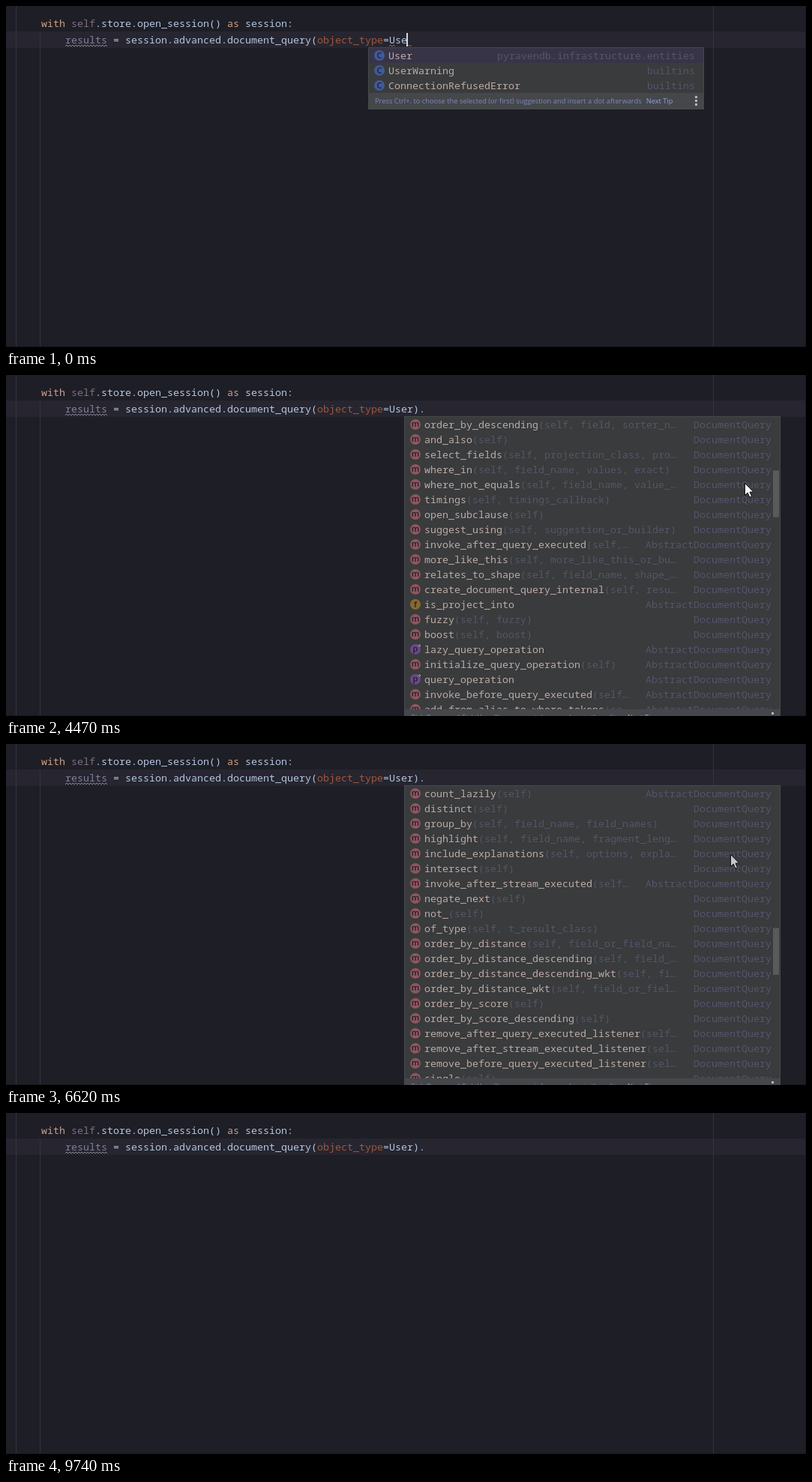
Animation, 1067 px wide and 455 px high, one loop 9.81 s. Source, as an HTML page with a canvas:

```html
<!DOCTYPE html>
<html lang="en">
<head>
<meta charset="utf-8">
<title>Code completion</title>
<style>
  html, body { margin: 0; width: 100%; height: 100%; overflow: hidden; background: #1e1e26; }
  canvas { display: block; }
</style>
</head>
<body>
<canvas id="stage" width="1067" height="455"></canvas>
<script>
const ctx = document.getElementById('stage').getContext('2d');
const W = 1067, H = 455, LOOP = 9810;
const CELL = 8, ROW = 20, TOP = 56, VIEW = 390;
const MONO = '13.333px "Noto Sans Mono", monospace';
const SMALL = '9.33px "Open Sans", sans-serif';
const ICON = '600 11px "Open Sans", sans-serif';

const C = {
  bg: '#1e1e26', line: '#262530', guide: '#34343f', edge: '#19191f',
  popup: '#393b3c', border: '#47494c', selected: '#383448', footer: '#45474a',
  name: '#bdaaa5', dim: '#55556b', thumb: '#595a5c', tip: '#7e89bd', link: '#8ea3e2',
  code: '#b4c6e0', key: '#cb9f85', self: '#7f7181', param: '#a0583a', weak: '#80809a',
};
const ICONS = { m: '#8f5560', p: '#69498a', f: '#8a672f', g: '#7d7028', C: '#40599a' };

// kind, name(args), then an optional owner: A or o
const OWNERS = { A: 'AbstractDocumentQuery', o: 'object', d: 'DocumentQuery' };
const members = `
p session :A
p index_name :A
p collection_name :A
p index_query :A
p query_class :A
p conventions :A
m first(self)
m add_parameter(self, name, value)
m take(self, count)
m include(self, path_or_include_builder_callback)
m statistics(self, stats_callback)
m no_tracking(self)
m skip(self, count)
m aggregate_by(self, builder_or_facet)
m where_equals(self, field_name, value_or_method)
m where(self, exact, kwargs)
m order_by(self, field, sorter_name_or_ordering)
m wait_for_non_stale_results(self, wait_timeout)
m where_greater_than(self, field_name, value, exact)
m proximity(self, proximity)
m or_else(self)
m where_exists(self, field_name)
m order_by_descending(self, field, sorter_name_or)
m and_also(self)
m select_fields(self, projection_class, projection)
m where_in(self, field_name, values, exact)
m where_not_equals(self, field_name, value_or_method)
m timings(self, timings_callback)
m open_subclause(self)
m suggest_using(self, suggestion_or_builder)
m invoke_after_query_executed(self, result) :A
m more_like_this(self, more_like_this_or_builder)
m relates_to_shape(self, field_name, shape_wkt)
m create_document_query_internal(self, result_class)
f is_project_into :A
m fuzzy(self, fuzzy)
m boost(self, boost)
p lazy_query_operation :A
m initialize_query_operation(self) :A
p query_operation :A
m invoke_before_query_executed(self, query) :A
m add_from_alias_to_where_tokens(self, alias) :A
p is_distinct :A
f parameter_prefix :A
m search(self, field_name, search_terms, operator)
m random_ordering(self, seed)
m no_caching(self)
m lazily(self, on_eval) :A
m add_after_query_executed_listener(self, action)
m add_after_stream_executed_listener(self, action)
m add_alias_to_includes_tokens(self, alias) :A
m add_before_query_executed_listener(self, action)
m add_order(self, field_name, descending, ordering)
m aggregate_by_facets(self, facets)
m aggregate_using(self, facet_setup_document_id)
m close_subclause(self)
m contains_all(self, field_name, values)
m contains_any(self, field_name, values)
m count(self)
m count_lazily(self) :A
m distinct(self)
m group_by(self, field_name, field_names)
m highlight(self, field_name, fragment_length, count)
m include_explanations(self, options, explanations)
m intersect(self)
m invoke_after_stream_executed(self, result) :A
m negate_next(self)
m not_(self)
m of_type(self, t_result_class)
m order_by_distance(self, field_or_field_name, lat)
m order_by_distance_descending(self, field_or_name)
m order_by_distance_descending_wkt(self, field_or)
m order_by_distance_wkt(self, field_or_field_name)
m order_by_score(self)
m order_by_score_descending(self)
m remove_after_query_executed_listener(self, action)
m remove_after_stream_executed_listener(self, action)
m remove_before_query_executed_listener(self, action)
m single(self)
m spatial(self, field_name_or_field, clause)
m using_default_operator(self, operator)
m where_between(self, field_name, start, end)
m where_ends_with(self, field_name, value, exact)
m where_greater_than_or_equal(self, field_name, value)
m where_less_than(self, field_name, value, exact)
m where_less_than_or_equal(self, field_name, value)
m where_equals_params(self, where_params)
m where_not_in(self, field_name, values)
m where_not_exists(self, field_name)
m where_lucene(self, field_name, where_clause, exact)
m where_not_equals_params(self, where_params_list)
m where_not_none(self, field_name)
m where_regex(self, field_name, pattern)
m where_starts_with(self, field_name, value, exact)
m within_radius_of(self, field_name, radius, lat)
p __class__ :o
g __dict__ :o
m __init__(self, object_type, session, index_name)
m __str__(self) :o
m __iter__(self) :A
g __annotations__ :o
m __delattr__(self, name) :o
m __dir__(self) :o
m __eq__(self, o) :o
m __format__(self, format_spec) :o
m __getattribute__(self, name) :o
m __hash__(self) :o
m __init_subclass__(cls) :o
m __ne__(self, o) :o
m __new__(cls) :o
m __reduce__(self) :o
m __reduce_ex__(self, protocol) :o
m __repr__(self) :o
m __setattr__(self, name, value) :o
m __sizeof__(self) :o
m __subclasshook__(cls) :o
g __doc__ :o
g __module__ :o
g __slots__ :o
m __enter__(self) :o
m __exit__(self) :o
m __len__(self) :o`.trim().split('\n').map(text => {
  const [, kind, label, owner = 'd'] = text.match(/^(\w) (.+?)(?: :(\w))?$/);
  const type = OWNERS[owner], room = 55 - type.length;
  const shown = label.length > room ? label.slice(0, room - 1) + '…' : label;
  const [, name, args] = shown.match(/^([^(]+)(.*)$/);
  return { kind, name, args, type };
});

const entity = (name, type) => ({ kind: 'C', name, args: '', type });
const classes = [
  entity('User', 'pyravendb.infrastructure.entities'),
  entity('UserWarning', 'builtins'),
  entity('ConnectionRefusedError', 'builtins'),
];

// [time, values...]
const scrollKeys = [[2900, 0], [4470, 440], [5320, 730], [6620, 1180], [8500, 1790], [9090, 2050]];
const mouseKeys = [[2070, 922, 98], [2720, 950, 124], [3300, 958, 130], [4470, 985, 144],
  [5320, 975, 146], [6620, 966, 147], [8500, 957, 151], [9120, 957, 152], [9490, 1066, 460]];

function at(keys, t) {
  if (t <= keys[0][0]) return keys[0].slice(1);
  const i = keys.findIndex(k => k[0] > t);
  if (i < 0) return keys[keys.length - 1].slice(1);
  const a = keys[i - 1], b = keys[i], u = (t - a[0]) / (b[0] - a[0]);
  return a.slice(1).map((v, j) => v + (b[j + 1] - v) * u);
}

function rect(x, y, w, h, color) {
  ctx.fillStyle = color;
  ctx.fillRect(x, y, w, h);
}

function text(str, x, y, color, font = MONO, align = 'left') {
  ctx.font = font;
  ctx.textAlign = align;
  ctx.fillStyle = color;
  ctx.fillText(str, x, y);
}

function codeLine(x, y, parts) {
  for (const [str, color] of parts) {
    text(str, x, y, color);
    x += str.length * CELL;
  }
  return x;
}

function squiggle(x0, x1, color) {
  ctx.beginPath();
  for (let x = x0, up = false; x <= x1; x += 2, up = !up) ctx.lineTo(x, up ? 52 : 54);
  ctx.strokeStyle = color;
  ctx.lineWidth = 1;
  ctx.stroke();
}

function icon(kind, x, y) {
  ctx.beginPath();
  ctx.arc(x, y, 7, 0, 7);
  ctx.fillStyle = ICONS[kind];
  ctx.fill();
  text(kind === 'g' ? 'f' : kind, x, y + (kind === 'p' ? 2.5 : kind === 'm' ? 3 : 4), '#1f2026', ICON, 'center');
  if (kind !== 'p') return;
  ctx.beginPath();
  ctx.moveTo(x + 3, y - 5);
  ctx.lineTo(x + 7, y - 5);
  ctx.moveTo(x + 5, y - 7);
  ctx.lineTo(x + 7, y - 5);
  ctx.lineTo(x + 5, y - 3);
  ctx.strokeStyle = '#9c92ac';
  ctx.lineWidth = 1;
  ctx.stroke();
}

function popup(x, w, items, view, scroll, tip) {
  const bottom = TOP + view;
  rect(x, TOP - 1, w, view + 23, C.border);
  rect(x + 1, TOP, w - 2, view, C.popup);
  ctx.save();
  ctx.beginPath();
  ctx.rect(x + 1, TOP, w - 2, view);
  ctx.clip();
  rect(x + 1, TOP - scroll, w - 2, ROW, C.selected);
  items.forEach((item, i) => {
    const y = TOP + 10 + i * ROW - scroll;
    if (y < TOP - ROW || y > bottom + ROW) return;
    icon(item.kind, x + 15, y);
    codeLine(x + 27, y + 5, [[item.name, C.name], [item.args, C.dim]]);
    text(item.type, x + w - 12, y + 5, C.dim, MONO, 'right');
  });
  const total = items.length * ROW;
  if (total > view) rect(x + w - 10, TOP + 1 + scroll * view / total, 8, view * view / total, C.thumb);
  ctx.restore();

  rect(x + 1, bottom, w - 2, 21, C.footer);
  text(tip, x + 9, bottom + 14, C.tip, SMALL);
  text('Next Tip', x + 15 + ctx.measureText(tip).width, bottom + 14, C.link, SMALL);
  for (const dy of [5, 10, 15]) rect(x + w - 12, bottom + dy - 1, 3, 3, '#b4b6b9');
}

function pointer(x, y, color) {
  ctx.beginPath();
  [[0, 0], [0, 16], [3.7, 12.6], [6.3, 18.6], [9, 17.4], [6.5, 11.6], [11.4, 11.6]]
    .forEach(([dx, dy]) => ctx.lineTo(x + dx + .5, y + dy + .5));
  ctx.closePath();
  ctx.fillStyle = color;
  ctx.fill();
  ctx.strokeStyle = '#101014';
  ctx.lineWidth = 1;
  ctx.stroke();
}

function draw(t) {
  rect(0, 0, W, H, C.bg);
  rect(0, 34, W, 22, C.line);
  rect(13, 0, 1, H, C.guide);
  rect(45, 35, 1, H, C.guide);
  rect(943, 0, 1, H, C.guide);
  rect(0, H - 1, W, 1, C.edge);
  rect(W - 1, 0, 1, H, C.edge);

  const typed = t < 180 ? 'Use' : t < 750 ? 'User' : t < 1320 ? 'User)' : 'User).';
  if (t >= 750 && t < 1320) {
    rect(407, 36, CELL, 18, '#3b3b4a');
    rect(543, 36, CELL, 18, '#3b3b4a');
  }
  codeLine(47, 28, [['with ', C.key], ['self', C.self], ['.store.open_session() ', C.code],
    ['as ', C.key], ['session:', C.code]]);
  const caret = codeLine(79, 50, [['results', C.weak], [' = session.advanced.document_query(', C.code],
    ['object_type', C.param], ['=' + typed, C.code]]);
  squiggle(79, 135, '#8a8690');
  if (t < 1070) {
    squiggle(511, 519, '#a8674d');
    squiggle(caret, caret + 7, '#8d6258');
  }

  // Caret blinks every 530 ms once typing has stopped
  if (t < 2070 || Math.floor((t - 2070) / 530) % 2) rect(caret - 1, 36, 2, 18, '#d6d8de');

  if (t < 750) {
    const items = classes.slice(0, t < 180 ? 3 : 2);
    popup(483, 448, items, items.length * ROW, 0,
      'Press Ctrl+. to choose the selected (or first) suggestion and insert a dot afterwards');
  } else if (t >= 1390 && t < 9740) {
    const scroll = Math.round(at(scrollKeys, t)[0] / 10) * 10;
    popup(531, 502, members, VIEW, scroll,
      'Ctrl+Down and Ctrl+Up will move caret down and up in the editor');
  }
  if (t >= 2070 && t < 9490) {
    const [x, y] = at(mouseKeys, t).map(Math.round);
    pointer(x, y, t < 5000 ? '#fff' : '#c6c6c8');
  }
}

const start = performance.now();
function frame() {
  draw((performance.now() - start) % LOOP);
  requestAnimationFrame(frame);
}
frame();
</script>
</body>
</html>
```
